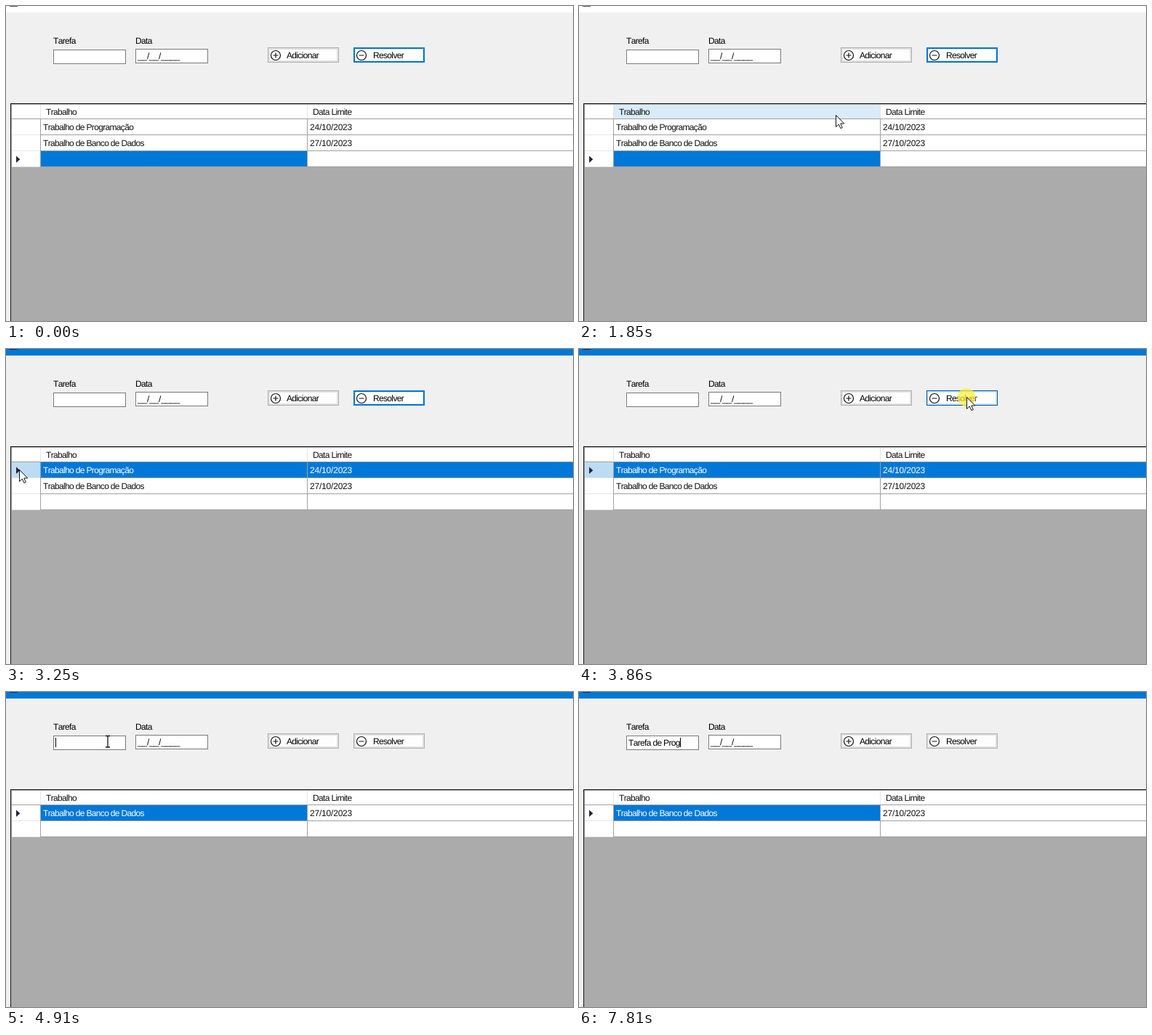
Recreate the animation shown at these times as an HTML page. Size 780 by 434 pixels, loop 8000 ms.

```html
<!DOCTYPE html>
<html lang="pt">
<head>
<meta charset="utf-8">
<title>Lista de tarefas</title>
<style>
  html, body { margin: 0; width: 100%; height: 100%; overflow: hidden; background: #f0f0f0; }
  svg { display: block; width: 780px; height: 434px; }
  rect { shape-rendering: crispEdges; }
  text {
    font: 12px "Liberation Sans", Arial, sans-serif;
    letter-spacing: -.66px;
    font-kerning: none;
    text-rendering: geometricPrecision;
    white-space: pre;
  }
  .num { letter-spacing: -.2px; }
  .icon { fill: none; stroke: #111; stroke-width: 1.2; }
  .field { fill: #fff; stroke: #7a7a7a; }
</style>
</head>
<body>
<svg viewBox="0 0 780 434">
  <rect width="780" height="434" fill="#f0f0f0"/>
  <rect id="title" width="780" height="9" fill="#fff"/>
  <path id="appIcon" d="M4 0Q5 1 7 1H14Q16 1 17 0Z" fill="#555"/>

  <text x="65" y="52">Tarefa</text>
  <text x="178" y="52">Data</text>
  <rect id="task" class="field" x="65.5" y="60.5" width="99" height="19"/>
  <rect id="date" class="field" x="178.5" y="59.5" width="99" height="19"/>
  <text id="typed" x="68" y="74"></text>
  <rect id="caret" y="63" width="1" height="13"/>
  <text class="num" x="181" y="73">__/__/____</text>

  <rect id="addEdge" x="360" y="57" width="98" height="21"/>
  <rect id="addRing" x="361" y="58" width="96" height="19"/>
  <rect x="363" y="60" width="92" height="15" fill="#fdfdfd"/>
  <path class="icon" d="M364.5 68a6.5 6.5 0 1 0 13 0a6.5 6.5 0 1 0-13 0M367.5 68h7M371 64.5v7"/>
  <text x="386" y="72">Adicionar</text>

  <rect id="solveEdge" x="478" y="57" width="98" height="21"/>
  <rect id="solveRing" height="17"/>
  <rect x="481" y="60" width="92" height="15" fill="#fdfdfd"/>
  <path class="icon" d="M482.5 68a6.5 6.5 0 1 0 13 0a6.5 6.5 0 1 0-13 0M485.5 68h7"/>
  <text x="505" y="72">Resolver</text>

  <rect x="6" y="134" width="774" height="300" fill="#111"/>
  <rect x="7" y="135" width="773" height="299" fill="#ababab"/>
  <g id="grid"></g>

  <circle id="press" r="12.5" fill="#fff03c" opacity=".72"/>
  <g id="cursor">
    <path id="arrow" d="M.5 .5V16.5L4.3 13L6.9 18.6L9.3 17.5L6.8 12H11.8Z" fill="#fff" stroke="#111"/>
    <path id="beam" d="M-3 -7.5h2.3l.7 .7l.7-.7h2.3M0-7V7.5M-3 8h2.3l.7-.7l.7 .7h2.3" fill="none" stroke="#111" stroke-width="1.3"/>
  </g>
</svg>
<script>
const LOOP = 8000, STEP = 70;
const BLUE = '#0078d7', LINE = '#a0a0a0', PALE = '#e5e5e5';
const el = id => document.getElementById(id);
const set = (id, attrs) => {
  for (const k in attrs) el(id).setAttribute(k, attrs[k]);
};
const show = (id, on) => set(id, { visibility: on ? 'visible' : 'hidden' });

// time, x, y of the pointer tip
const path = [
  [70, 737, 418], [260, 550, 253], [440, 550, 253], [510, 532, 215],
  [730, 490, 117], [870, 440, 76], [1080, 320, 84], [1290, 191, 92],
  [1430, 240, 72], [1570, 345, 190], [1640, 395, 231], [1710, 450, 195],
  [1780, 412, 152], [1850, 353, 150], [2130, 282, 106], [2340, 207, 197],
  [2480, 172, 190], [2760, 119, 167], [2970, 18, 166], [3330, 18, 166],
  [3790, 533, 66], [4070, 533, 66], [4280, 455, 275], [4630, 250, 88],
  [4770, 140, 68], [4910, 140, 68], [4980, 190, 72], [5050, 213, 88],
  [5680, 213, 88]
];
const clicks = [[3050, 3200], [3850, 4070], [4770, 4900]];
const typing = [
  [0, ''], [5680, 'T'], [5880, 'Ta'], [5950, 'Tae'], [6280, 'Ta'], [6480, 'Tar'],
  [6680, 'Tare'], [6780, 'Taref'], [6880, 'Tarefa'], [6980, 'Tarefa '],
  [7080, 'Tarefa d'], [7280, 'Tarefa de'], [7380, 'Tarefa de '],
  [7480, 'Tarefa de P'], [7680, 'Tarefa de Pro'], [7810, 'Tarefa de Prog']
];

const prog = ['Trabalho de Programação', '24/10/2023'];
const bank = ['Trabalho de Banco de Dados', '27/10/2023'];
const tables = [
  { from: 0, rows: [prog, bank, ['', '']], current: 2 },
  { from: 3120, rows: [prog, bank, ['', '']], current: 0, whole: true },
  { from: 4000, rows: [bank, ['', '']], current: 0 }
];

const latest = (list, t, key) => list.filter(item => item[key] <= t).pop();

function pointer(t) {
  const i = path.findIndex(p => p[0] > t);
  if (t < path[0][0] || i < 0) return null;
  const [t0, x0, y0] = path[i - 1], [t1, x1, y1] = path[i];
  const n = Math.max(1, Math.round((t1 - t0) / STEP));
  const u = Math.floor((t - t0) / (t1 - t0) * n) / n;
  return { x: x0 + (x1 - x0) * u, y: y0 + (y1 - y0) * u };
}

const inside = (p, x, y, w, h) =>
  !!p && p.x >= x && p.x < x + w && p.y >= y && p.y < y + h;

const box = (x, y, w, h, fill) =>
  `<rect x="${x}" y="${y}" width="${w}" height="${h}" fill="${fill}"/>`;
const label = (x, y, s, fill = '#111', cls = '') =>
  `<text x="${x}" y="${y}" fill="${fill}" class="${cls}">${s}</text>`;

function gridMarkup(table, p) {
  const heat = (x, y, w, h) => inside(p, x, y, w, h) ? '#d9ebf9' : '#fff';
  let s = box(8, 136, 39, 19, '#fff')
    + box(48, 136, 366, 19, heat(48, 136, 366, 19))
    + box(415, 136, 365, 19, heat(415, 136, 365, 19))
    + box(47, 136, 1, 19, PALE) + box(414, 136, 1, 19, PALE)
    + box(8, 155, 772, 1, LINE)
    + label(55, 150, 'Trabalho') + label(422, 150, 'Data Limite');
  table.rows.forEach(([name, due], i) => {
    const y = 156 + 22 * i, now = i === table.current;
    const h = i ? 21 : 21;
    const whole = now && table.whole;
    s += box(8, y, 39, h, whole ? '#bcdcf4' : heat(8, y, 39, h))
      + box(48, y, 366, h, now ? BLUE : '#fff')
      + box(415, y, 365, h, whole ? BLUE : '#fff')
      + box(47, y, 1, h, LINE) + box(414, y, 1, h, LINE)
      + box(8, y + h, 39, 1, PALE) + box(47, y + h, 733, 1, LINE)
      + label(51, y + 15, name, now ? '#fff' : '#111')
      + label(418, y + 15, due, whole ? '#fff' : '#111', 'num');
    if (now) s += `<path d="M14 ${y + 6.5}l5.3 4.8l-5.3 4.8z" fill="#2a2038"/>`;
  });
  return s;
}

let lastGrid = '';
function draw(t) {
  const p = pointer(t);
  const active = t >= 3120, editing = t >= 4840;
  const pressed = clicks.some(([a, b]) => t >= a && t < b);

  set('title', { fill: active ? BLUE : '#fff' });
  set('appIcon', { fill: active ? '#12304d' : '#555' });

  const overTask = inside(p, 65, 60, 100, 20), overDate = inside(p, 178, 59, 100, 20);
  const fade = t >= 5050 && t < 5680 ? 1 - Math.floor((t - 5050) / 140) / 4.5 : 0;
  const tone = Math.round(122 - 99 * (overDate ? 1 : fade));
  set('task', { stroke: editing ? BLUE : overTask ? '#171717' : '#7a7a7a' });
  set('date', { stroke: `rgb(${tone},${tone},${tone})` });

  const overAdd = inside(p, 360, 57, 98, 21), overSolve = inside(p, 478, 57, 98, 21);
  set('addEdge', { fill: overAdd ? BLUE : '#adadad' });
  set('addRing', { fill: overAdd ? '#e5f1fb' : '#e1e1e1' });
  const down = pressed && overSolve;
  const edge = down || editing ? 1 : 2;
  set('solveEdge', { fill: down ? '#005499' : editing ? '#adadad' : BLUE });
  set('solveRing', {
    x: 478 + edge, y: 57 + edge, width: 98 - 2 * edge, height: 21 - 2 * edge,
    fill: down ? '#cce4f7' : overSolve ? '#e5f1fb' : '#e1e1e1'
  });

  const grid = gridMarkup(latest(tables, t, 'from'), p);
  if (grid !== lastGrid) el('grid').innerHTML = lastGrid = grid;

  const text = latest(typing, t, 0)[1];
  if (el('typed').textContent !== text) el('typed').textContent = text;
  const width = text ? el('typed').getComputedTextLength() : 0;
  set('caret', { x: Math.round(68 + width) });
  show('caret', editing && !(t >= 5470 && t < 5680));

  const beam = overTask || overDate;
  show('press', p && pressed);
  show('arrow', p && !beam);
  show('beam', p && beam);
  if (p) {
    set('press', { cx: p.x, cy: p.y + .5 });
    set('cursor', { transform: `translate(${Math.round(p.x)} ${Math.round(p.y)})` });
  }
}

const start = performance.now();
function tick() {
  draw((performance.now() - start) % LOOP);
  requestAnimationFrame(tick);
}
tick();
</script>
</body>
</html>
```
